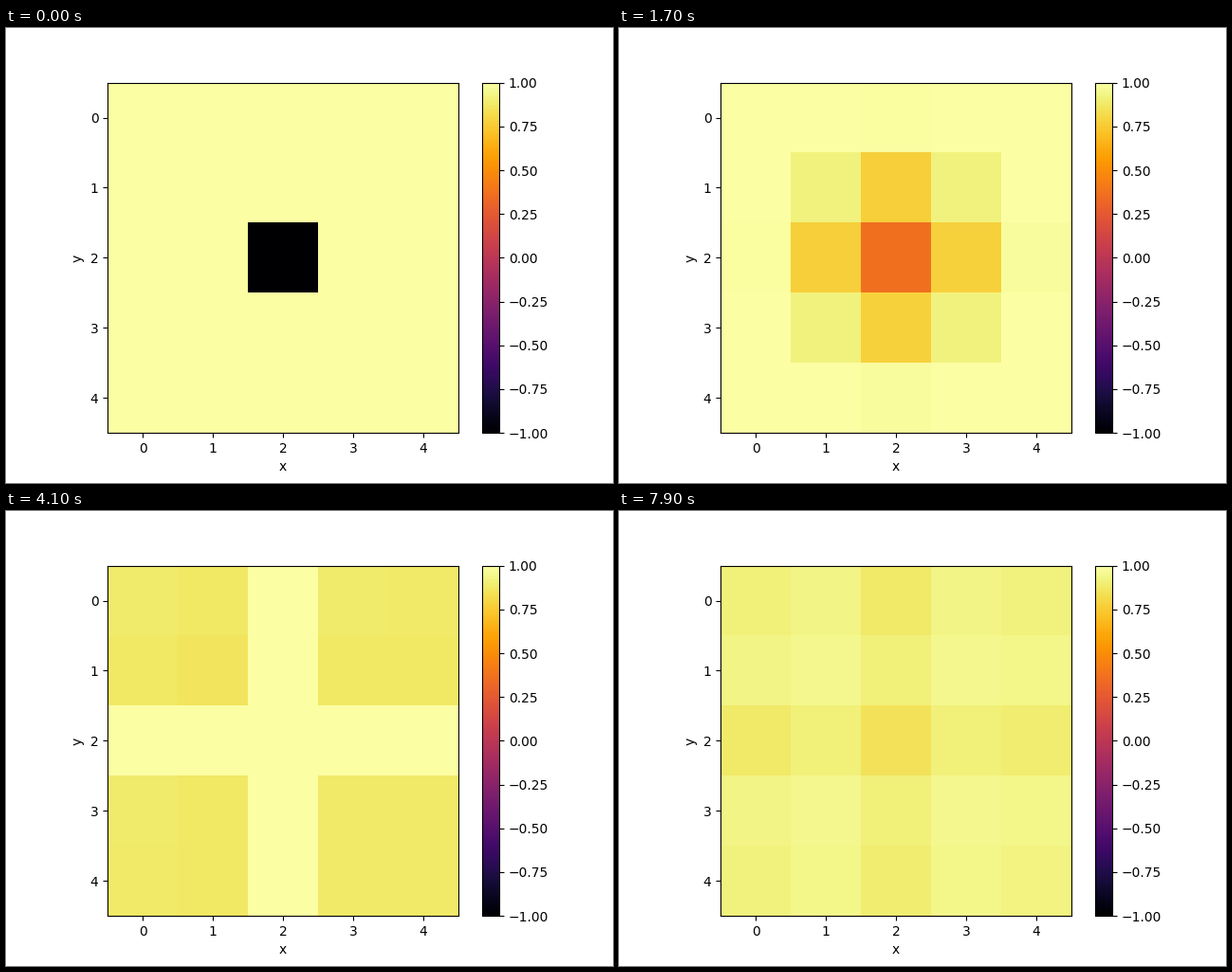
Recreate the animation shown at these times as a matplotlib script. Size 640 px wide and 480 px high, loop 8 s.

```python
"""One flipped spin spreading over a 5 x 5 Heisenberg lattice."""
import numpy as np
import matplotlib.pyplot as plt
from matplotlib.animation import FuncAnimation

SIZE = 5
FRAMES = 80
DT = 3 / 99


def bond_gate(i):
    """Exchange evolution over DT between sites i and i + 1 of a chain."""
    gate = np.eye(SIZE, dtype=complex)
    mix = (np.exp(-2j * DT) - 1) / 2
    gate[i:i + 2, i:i + 2] += mix * np.array([[1, -1], [-1, 1]])
    return gate


step = np.eye(SIZE, dtype=complex)
for i in range(SIZE - 1):
    step = bond_gate(i) @ step


def magnetization(n):
    """<Z> on every site; rows and columns evolve independently."""
    amp = np.linalg.matrix_power(step, n)[:, SIZE // 2]
    prob = np.abs(amp) ** 2
    return 1 - 2 * np.outer(prob, prob)


fig, ax = plt.subplots(figsize=(6.4, 4.8), dpi=100)
image = ax.imshow(magnetization(0), cmap="inferno", vmin=-1, vmax=1)
ax.set_xlabel("x")
ax.set_ylabel("y")
fig.colorbar(image, ax=ax)


def update(n):
    image.set_data(magnetization(n))
    return [image]


anim = FuncAnimation(fig, update, frames=FRAMES, interval=100,
                     repeat=True, repeat_delay=0)
plt.show()
```
